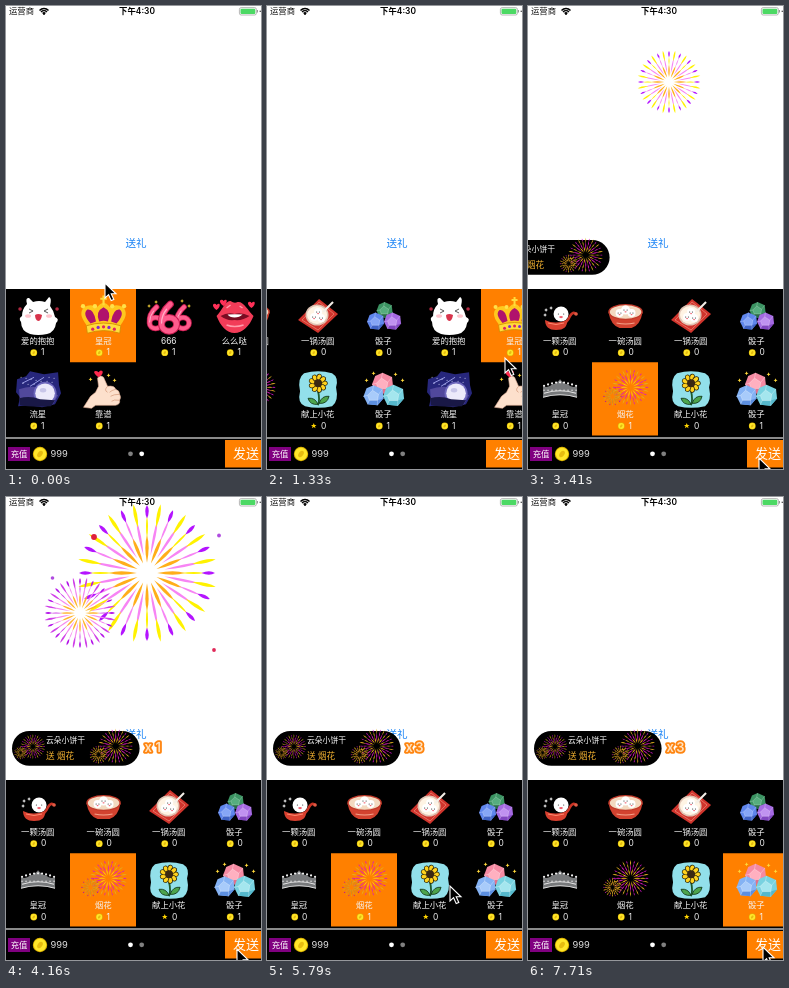
An HTML page with a canvas for the animation above (8000 ms loop, 255x463 px).

```html
<!DOCTYPE html>
<html lang="zh-CN">
<head>
<meta charset="utf-8">
<style>
html, body { margin: 0; height: 100%; overflow: hidden; background: #fff; }
canvas { display: block; width: 255px; height: 463px; }
</style>
</head>
<body>
<canvas id="stage"></canvas>
<script>
const W = 255, H = 463, LOOP = 8000, TICK = 148.3;
const PAGE = 262, COL = 65.5, ROW = 73.3, TOP = 283;
const ORANGE = '#ff8000', FONT = 'Inter, "Noto Sans CJK SC", "Noto Sans CJK JP", sans-serif';
const canvas = document.getElementById('stage'), g = canvas.getContext('2d');
const dpr = window.devicePixelRatio || 1;
canvas.width = W * dpr;
canvas.height = H * dpr;

// ---- drawing helpers ----
function rect(x, y, w, h, fill, r = 0) {
  g.fillStyle = fill;
  g.beginPath();
  g.roundRect(x, y, w, h, r);
  g.fill();
}
function oval(x, y, rx, ry, fill, turn = 0) {
  g.fillStyle = fill;
  g.beginPath();
  g.ellipse(x, y, rx, ry, turn, 0, 7);
  g.fill();
}
const dot = (x, y, r, fill) => oval(x, y, r, r, fill);
function shape(d, fill, stroke, width = 1) {
  const p = new Path2D(d);
  if (fill) { g.fillStyle = fill; g.fill(p); }
  if (stroke) { g.strokeStyle = stroke; g.lineWidth = width; g.stroke(p); }
}
function text(s, x, y, size, fill, align = 'center', weight = 400) {
  g.font = `${weight} ${size}px ${FONT}`;
  g.textAlign = align;
  g.fillStyle = fill;
  g.fillText(s, x, y);
}
function at(x, y, scale, draw) {
  g.save();
  g.translate(x, y);
  g.scale(scale, scale);
  draw();
  g.restore();
}
function sparkles(points, fill = '#ffd83a') {
  for (const [x, y] of points) shape(`M${x} ${y - 2}l.6 1.4 1.4.6-1.4.6-.6 1.4-.6-1.4-1.4-.6 1.4-.6z`, fill);
}
// Linear interpolation through rows of [step, ...values]
function track(keys, n) {
  let i = 0;
  while (i < keys.length - 2 && n >= keys[i + 1][0]) i++;
  const a = keys[i], b = keys[i + 1];
  const u = Math.max(0, Math.min(1, (n - a[0]) / (b[0] - a[0])));
  return a.slice(1).map((v, k) => v + (b[k + 1] - v) * u);
}

// ---- fireworks: rays of pointed spindles; colors are core, ray, tip, accent ----
const BRIGHT = ['#ffae1a', '#f784f4', '#fff200', '#b414ff'];
const ROSE = ['#ffb52e', '#f58af0', '#d040e8', '#b414e8'];
const NIGHT = ['#ffc21a', '#e018c0', '#e0b020', '#d414c8'];
const GOLD = ['#d89a20', '#c89020', '#d8a020', '#b01898'];
function burst(x, y, R, colors, rays = 32, hollow = 0) {
  for (let i = 0; i < rays; i++) {
    g.save();
    g.translate(x, y);
    g.rotate(i / rays * 2 * Math.PI);
    g.scale(R, R);
    const thin = .5 / R;
    const ray = (from, to, color, width) => {
      from = Math.max(from, hollow);
      if (from >= to) return;
      const mid = from + (to - from) * .6, w = Math.max(thin, width);
      g.fillStyle = color;
      g.beginPath();
      g.moveTo(from, 0);
      g.quadraticCurveTo(mid, w * 2, to, 0);
      g.quadraticCurveTo(mid, -w * 2, from, 0);
      g.fill();
    };
    if (i % 2) {
      ray(.26, .8, colors[1], .019);
      ray(.68, 1.03, colors[2], .026);
    } else {
      ray(.15, .56, colors[0], .024);
      ray(.5, .84, colors[i % 4 ? 1 : 2], .015);
      ray(.8, 1, colors[3], .026);
    }
    g.restore();
  }
}
function fireworkIcon() {
  burst(5, -2, 18, NIGHT, 28);
  burst(-13, 7, 9.5, GOLD, 20);
}

// ---- gift icons, centred on 0,0 ----
function ghost() {
  dot(-18, -7, 1.8, '#b02840');
  dot(19, -7, 1.8, '#b02840');
  shape('M-11-12Q-13-19-9-18L-5-14Q1-16 7-14L11-19Q14-18 12-10 16-5 17 1 22 3 18 7 17 16 9 18 0 20-8 18-17 15-17 6-20 2-16 0-16-7-11-12Z', '#fff');
  shape('M-9-7l4 2-4 2M10-7l-4 2 4 2', null, '#444', .9);
  shape('M-3-1Q0-3 4-1 3 5 0 5-3 4-3-1Z', '#d8344c');
  oval(-10, 0, 3, 1.8, '#ffc4cc');
  oval(11, 0, 3, 1.8, '#ffc4cc');
}
function crown() {
  shape('M-15 15L-16 8Q-24-2-18-8-12-12-6-8Q0-16 6-8 12-12 18-8 24-2 16 8L15 15Q0 11-15 15Z', '#ffc81e');
  shape('M-12 7Q-20-2-15-6-9-7-7 5ZM12 7Q20-2 15-6 9-7 7 5ZM-4 5Q-8-4 0-8 8-4 4 5Q0 4-4 5Z', '#b0126c');
  shape('M-16 9Q0 4 16 9L15 16Q0 11-15 16Z', '#ffdc3c', '#d48a00', .8);
  shape('M0-19V-10M-3-16H3', null, '#ffdc3c', 2);
  for (const x of [-19, -8, 8, 19]) dot(x, -9, 2, '#ffe04a');
  for (const x of [-10, -5, 0, 5, 10]) dot(x, 10 + x * x / 45, 1.5, x % 10 ? '#7b2bd0' : '#e0245e');
}
function six(x, y, s) {
  at(x, y, s, () => {
    g.lineCap = 'round';
    for (const [color, width] of [['#c81c50', 5.6], ['#ff5c8d', 4]]) {
      shape('M1-15Q-7-8-6 1A6 5.5 0 1 0 6 1 6 5.5 0 0 0-6 1', null, color, width);
    }
    shape('M-2-11Q-6-6-6 0', null, '#ffb0c8', 1);
    g.lineCap = 'butt';
  });
}
function tripleSix() {
  six(-13.5, 6, 1);
  six(14, 6, 1);
  six(0, 7, 1.25);
  sparkles([[-20, -10], [-13, -14], [13, -15], [20, -10]]);
}
function lips() {
  shape('M-18 0C-13-5-9-16-4-15Q0-12 3-14C9-15 13-6 19 0 15 10 8 17 0 17-8 17-14 10-18 0Z', '#f23c58');
  shape('M-14 0Q-7-4 0-2 7-4 15 0 8 5 0 4-8 5-14 0Z', '#7a0c22');
  shape('M-7-1.5Q0-2 8-1.5 5 1.5 0 1.5-5 1.5-7-1.5Z', '#fff');
  shape('M-8 9Q0 12 9 9M-8-8L-4-11M5-10L8-8', null, '#ff9cab', 1.5);
  for (const [x, y] of [[-18, -9], [-11, -13], [17, -11]]) {
    shape(`M${x} ${y + 3}c-4-3-4-5-3-6q2-1 3 1 2-2 3-1 1 3-3 6Z`, '#ff3058');
  }
}
function meteor() {
  shape('M-21-10L-12-13-8-18 6-15 20-17 21-4 23 4 17 15 4 18-9 16-20 17-18 8-22 3Z', '#27277c');
  shape('M-19 0Q-6-5 8 0L20 6 15 15 3 17-18 15Z', '#51489c');
  dot(7, 4, 11.5, '#6e68bc');
  dot(7, 4, 9.8, '#eceafa');
  oval(5, 1, 3.2, 2.2, '#c8c6e8');
  shape('M-19 9Q-8 6 2 10L17 11 13 17Q-8 18-18 16Z', '#191846');
  shape('M-16-6L-4-12M-8-3L6-12', null, '#b4b8ff', .8);
  for (let i = 0; i < 14; i++) dot(-17 + i * 13 % 34, -12 + i * 7 % 10, .5, '#dfe4ff');
}
function fingerHeart() {
  shape('M-20 18L-13 7-8 3-5-3-6-11Q-4-15 0-12L4-3Q11-4 12 0 16 1 16 5 18 8 16 11 17 15 12 16L-8 16-12 19Z', '#fde0cc', '#dfae94', .6);
  shape('M4-3Q0 1 4 3M12 0Q8 1 6 3M16 5Q10 5 7 7M16 11Q10 10 8 12', null, '#d9a183', .8);
  shape('M-5-12c-4-3-5-5-4-6q2-1 4 1 2-3 4-1 1 3-4 6Z', '#ff2b4e');
  sparkles([[-13, -10], [5, -14], [11, -9]]);
}
function face(x, y, r) {
  dot(x, y, r, '#fff');
  dot(x - r * .35, y, .6, '#333');
  dot(x + r * .35, y, .6, '#333');
  oval(x, y + r * .4, r * .25, r * .15, '#f06070');
}
function spoon() {
  shape('M2 8Q7 7 10 0 13-5 16-2', null, '#c93425', 2.6);
  dot(16, -2, 1.8, '#e05a44');
  face(1, -2, 7.5);
  shape('M-15 4Q-5 9 7 4 8 14-4 14-15 14-15 4Z', '#d8402f');
  shape('M-12 7Q-4 10 4 7', null, '#ff8a70', 1);
  sparkles([[-14, -6], [-9, -8], [-15, -1]], '#fff');
}
function bowl() {
  shape('M-17-4Q-15 9-6 12H6Q15 9 17-4Z', '#d2422f');
  oval(0, -4, 17.3, 8, '#c23a2a');
  oval(0, -4, 15.8, 6.7, '#f3d9c0');
  face(-6, -3, 4);
  face(6, -3, 4);
  face(0, -6, 4.5);
  shape('M-9 7Q0 9 9 7', null, '#f5a48c', 1.2);
}
function pot() {
  shape('M1-17L20-2 0 17-20 4Z', '#d0342c');
  shape('M1-14L16-2 0 14-16 4Z', null, '#f08a78', .7);
  oval(-1, -1, 11.5, 10.5, '#e0c4b4');
  oval(-1, -1, 10, 9, '#fff4e4');
  face(-4, 1, 4);
  face(3, 2, 4);
  face(0, -4, 4);
  shape('M5-4L15-14', null, '#f4efe8', 2);
}
function gem(x, y, r, dark, mid, light) {
  at(x, y, r / 10, () => {
    shape('M0-10L9-6 10 3 4 10-6 9-10 1-7-7Z', mid);
    shape('M10 3L4 10-6 9-4 5 4 5Z', dark);
    shape('M-1-5L5-1 4 5-4 5-6 0Z', light, '#ffffff66', .7);
    shape('M0-10L-1-5M9-6L5-1M4 10V5M-6 9L-4 5M-10 1L-6 0', null, '#ffffff66', .7);
  });
}
function smallDice() {
  gem(1, -6, 8, '#286b46', '#3b9362', '#56ad7e');
  gem(-8, 5, 8.5, '#3f62c4', '#5f86ec', '#86a6f6');
  gem(9, 5, 8.5, '#8146c0', '#a56ae2', '#c092f0');
}
function tiara() {
  shape('M-17 8V-3Q-11-1-8-5-4-5 0-10 4-5 8-5 11-1 17-3V8Q0 3-17 8Z', '#77797b');
  shape('M-17 8Q0 3 17 8M-16 4Q0-1 16 4', null, '#e8e8e8', 1.1);
  for (let x = -16; x <= 16; x += 4) {
    dot(x, -3 - 4 * Math.cos(x / 11), 1.1, '#eee');
    dot(x, 1, .8, '#ddd');
  }
}
function sunflower() {
  shape('M-14-16Q0-20 14-16 21-12 18-2 21 12 14 17 0 20-13 17-21 14-18 2-21-11-14-16Z', '#92e0ea');
  shape('M0 2Q2 10 0 16', null, '#1e5a2c', 1.8);
  shape('M1 14Q4 6 11 7 9 15 1 14ZM0 15Q-3 8-10 9-8 16 0 15Z', '#4da44c', '#153d1d', .9);
  for (let i = 0; i < 9; i++) {
    const a = i * Math.PI / 4.5;
    oval(6 * Math.cos(a), -6 + 6 * Math.sin(a), 3.6, 2.7, '#2b2407', a);
    oval(6 * Math.cos(a), -6 + 6 * Math.sin(a), 2.9, 2, '#ffd21f', a);
  }
  dot(0, -6, 4, '#3b2812');
}
function bigDice() {
  gem(-1, -6, 10.5, '#e0708c', '#f58aa2', '#ffb0c0');
  gem(-10, 6, 10, '#5c8fe0', '#84b2f4', '#a8cbfa');
  gem(10, 6, 10.5, '#55b8cc', '#78d2e0', '#a4e6ee');
  sparkles([[-17, -9], [-10, -16], [12, -15], [19, -9]]);
}

const gifts = [
  ['一颗汤圆', spoon, 0], ['一碗汤圆', bowl, 0], ['一锅汤圆', pot, 0], ['骰子', smallDice, 0],
  ['皇冠', tiara, 0], ['烟花', fireworkIcon, 1], ['献上小花', sunflower, 0], ['骰子', bigDice, 1],
  ['爱的抱抱', ghost, 1], ['皇冠', crown, 1], ['666', tripleSix, 1], ['么么哒', lips, 1],
  ['流星', meteor, 1], ['靠谱', fingerHeart, 1]
];

// ---- motion, in steps of TICK ----
const pointer = [[0, 99, 277], [1, 104, 284], [4, 148, 354], [5, 150, 356], [6, 150, 356], [7, 181, 353],
  [9, 238, 352], [12, 124, 355], [14, 106, 386], [17, 104, 390], [21, 231, 452], [34, 231, 452],
  [38, 192, 400], [39, 183, 389], [40, 168, 390], [42, 168, 390], [46, 232, 441], [47, 231, 415],
  [48, 230, 402], [50, 230, 402], [52, 235, 450]];
const scroll = [[6, 0], [7, 13.5], [9, 150], [10, 225], [11, 255], [12, PAGE]];
const slide = [[22, -140], [23, -52], [24, 0]];
const bigSize = [[22, 10], [23, 31], [25, 52], [28, 68], [31, 69]];
const smallSize = [[25, 4], [28, 35], [31, 37]];

function coin(x, y, r) {
  dot(x, y, r, '#dcb400');
  dot(x, y, r * .86, '#ffe62a');
  oval(x, y, r * .32, r * .5, '#e6bc10', .6);
}

function statusBar() {
  text('运营商', 3, 5.5, 8.4, '#111', 'left');
  for (const r of [2.6, 4.8, 7]) {
    g.strokeStyle = '#000';
    g.lineWidth = 1.5;
    g.beginPath();
    g.arc(38, 9, r - .6, -2.35, -.79);
    g.stroke();
  }
  dot(38, 8, 1, '#000');
  text('下午4:30', 131, 5.5, 8.4, '#000', 'center', 600);
  g.strokeStyle = '#999';
  g.lineWidth = .7;
  g.beginPath();
  g.roundRect(233.4, 1.6, 17, 7.4, 1.8);
  g.stroke();
  rect(234.5, 2.7, 14.8, 5.2, '#4cd964', 1);
  rect(251, 4, 1, 2.6, '#999');
  rect(253.6, 4.8, 1.4, 1, '#222');
}

function cell(i, shift, selected, zoom) {
  const [label, icon, price] = gifts[i], onSecond = i > 7;
  const x = -1 + i % 4 * COL + (onSecond ? 0 : -PAGE) + shift;
  if (x > W || x < -COL) return;
  const y = TOP + (i % 8 > 3 ? ROW : 0), mid = x + COL / 2;
  if (selected) rect(Math.floor(x), y, 66, ROW, ORANGE);
  at(mid + .3, y + 27, selected ? zoom : 1, icon);
  text(label, mid, y + 52.3, 8.4, '#f4f4f4');
  if (i === 6) at(mid - 4, y + 63.5, 1, () => shape('M0-2.8l.8 1.9 2 .1-1.6 1.3.6 2-1.8-1.2-1.8 1.2.6-2-1.6-1.3 2-.1z', '#ffd400'));
  else coin(mid - 4, y + 63.7, 3.4);
  text(price, mid + 3.2, y + 63.8, 8.4, '#f4f4f4', 'left');
}

function panel(n) {
  const [shift] = track(scroll, n);
  const chosen = n < 15 ? 9 : n < 41 ? 5 : n < 50 ? 6 : 7;
  const zoom = 1 + .08 * Math.max(0, 1 - n / 5);
  rect(0, TOP, W, H - TOP, '#000');
  gifts.forEach((_, i) => cell(i, shift, i === chosen, zoom));
  rect(0, 431.2, W, 1.5, '#b8b8b8');
  rect(2, 441, 22, 14, '#800080');
  text('充值', 13, 448.2, 8.4, '#fff');
  coin(34, 448, 7.2);
  text('999', 44.5, 448.2, 9.3, '#ddd', 'left');
  const first = shift > PAGE / 2;
  dot(124.5, 447.8, 2.4, first ? '#fff' : '#808080');
  dot(135.7, 447.8, 2.4, first ? '#808080' : '#fff');
  rect(219, 434, 36, 27.5, ORANGE);
  text('发送', 227, 448, 13, '#fff', 'left', 300);
}

function show(n) {
  if (n < 23 || n > 37) return;
  g.save();
  g.globalAlpha = Math.min(1, (38 - n) / 6);
  const hollow = Math.max(0, (n - 30) / 8);
  burst(141, 76, track(bigSize, n)[0], BRIGHT, 32, hollow);
  if (n > 25) burst(74, 116, track(smallSize, n)[0], ROSE, 32, hollow);
  if (n > 26 && n < 32) {
    dot(88, 40, 2.9, '#e0203c');
    dot(213, 38.5, 1.9, '#b04ce0');
    dot(46.5, 81, 1.8, '#b04ce0');
    dot(208, 153, 1.9, '#e02858');
  }
  g.restore();
}

function banner(n) {
  if (n < 23) return;
  g.save();
  g.translate(track(slide, n)[0], 0);
  rect(6, 234, 127.6, 34.8, '#000', 17.4);
  at(23.5, 251, .68, fireworkIcon);
  at(105, 251, .95, fireworkIcon);
  text('云朵小饼干', 40, 244, 7.8, '#fff', 'left');
  text('送 烟花', 40, 259, 8.6, '#f0b030', 'left');
  g.restore();
  if (n < 25) return;
  const count = n < 30 ? 1 : n < 33 ? 2 : 3;
  const pop = [25, 30, 33].includes(n) ? 1.25 : 1;
  at(147.5, 251.5, pop, () => {
    g.lineJoin = 'round';
    g.strokeStyle = '#ff8510';
    g.lineWidth = 3.6;
    for (const [s, x] of [['x', -5.2], [count, 4.8]]) {
      g.font = `600 13px ${FONT}`;
      g.textAlign = 'center';
      g.strokeText(s, x, 0);
      text(s, x, 0, 13, '#ffe2c0', 'center', 600);
    }
    g.lineJoin = 'miter';
  });
}

function render(now) {
  const n = Math.floor((now % LOOP + 4) / TICK);
  g.setTransform(dpr, 0, 0, dpr, 0, 0);
  g.textBaseline = 'middle';
  rect(0, 0, W, H, '#fff');
  statusBar();
  text('送礼', 130, 237.5, 10.6, '#1580f5');
  panel(n);
  show(n);
  banner(n);
  at(...track(pointer, n), 1, () => shape('M0 0V15L3.6 11.7 6.2 17.6 8.8 16.5 6.2 10.8H11Z', '#000', '#fff', 1.1));
  requestAnimationFrame(render);
}
requestAnimationFrame(render);
</script>
</body>
</html>
```
